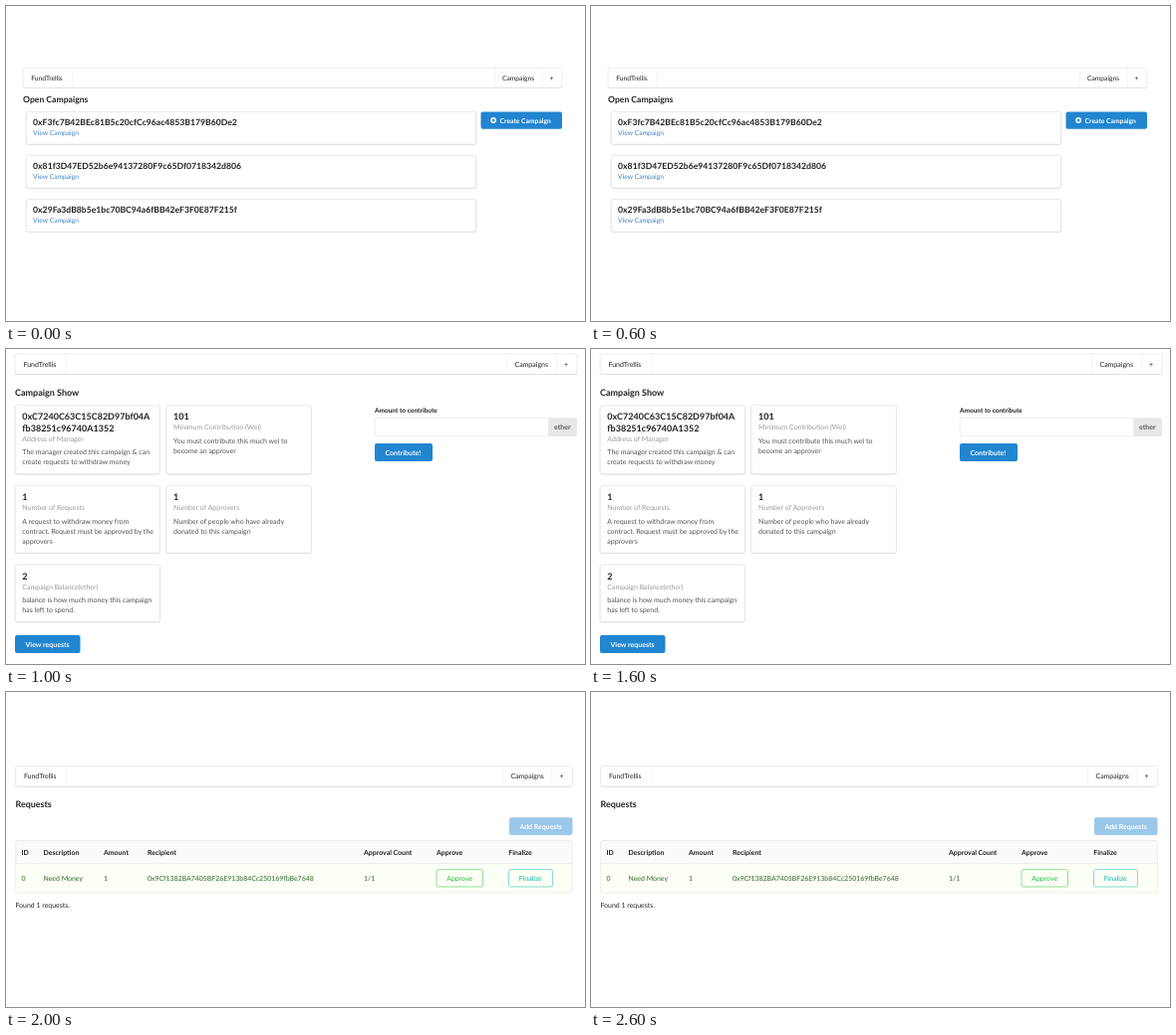
These frames come from a looping animation (581 px wide and 317 px high, 3 s). An HTML page with a canvas:

```html
<!DOCTYPE html>
<html lang="en">
<head>
<meta charset="utf-8">
<title>Campaign screens</title>
<style>
  html, body { margin: 0; width: 100%; height: 100%; overflow: hidden; background: #fff; }
  canvas { display: block; }
</style>
</head>
<body>
<canvas id="stage" width="581" height="317"></canvas>
<script>
const ctx = document.getElementById('stage').getContext('2d');
const SCREEN_MS = 1000;
const INK = 'rgba(0,0,0,.87)';
const LINE = 'rgba(34,36,38,.15)';
const BLUE = '#2185d0';
let unit = 0.5; // stage pixels per interface pixel

// y is the middle of the text line
function text(str, x, y, { size = 14, bold = false, color = INK } = {}) {
  const px = size * unit;
  ctx.font = `${bold ? 700 : 400} ${px}px Lato, sans-serif`;
  ctx.textRendering = 'geometricPrecision';
  ctx.fillStyle = color;
  ctx.fillText(str, x, y + px * 0.387);
}

const title = (str, x, y) => text(str, x, y, { size: 18, bold: true });

function box(x, y, w, h, fill, radius = 4) {
  ctx.beginPath();
  ctx.roundRect(x, y, w, h, typeof radius === 'number' ? radius * unit : radius.map(r => r * unit));
  ctx.fillStyle = fill;
  ctx.fill();
}

function outline(x, y, w, h, color) {
  ctx.beginPath();
  ctx.roundRect(x + unit / 2, y + unit / 2, w - unit, h - unit, 4 * unit);
  ctx.lineWidth = unit;
  ctx.strokeStyle = color;
  ctx.stroke();
}

function raised(x, y, w, h, blur, shadow) {
  ctx.save();
  ctx.shadowColor = shadow;
  ctx.shadowBlur = blur * unit;
  ctx.shadowOffsetY = unit;
  box(x, y, w, h, '#fff');
  ctx.restore();
}

function menu(x, y, w) {
  const h = 42 * unit, mid = y + h / 2, right = x + w - unit;
  const plus = right - 41 * unit;
  const campaigns = plus - 99 * unit;
  raised(x, y, w, h, 2, LINE);
  outline(x, y, w, h, LINE);
  ctx.fillStyle = 'rgba(34,36,38,.1)';
  for (const edge of [x + 103 * unit, campaigns, plus]) ctx.fillRect(edge, y + unit, unit, h - 2 * unit);
  text('FundTrellis', x + 17 * unit, mid);
  text('Campaigns', campaigns + 16 * unit, mid);
  text('+', plus + 16 * unit, mid);
}

function card(x, y, w, h, { head, meta, body = [], link }) {
  raised(x, y, w, h, 3, '#d4d4d5');
  outline(x - unit, y - unit, w + 2 * unit, h + 2 * unit, '#d4d4d5');
  const left = x + 14 * unit;
  let top = y + 10.14 * unit;
  const row = (str, height, style) => {
    text(str, left, top + height * unit / 2, style);
    top += height * unit;
  };
  head.forEach(str => row(str, 23.1, { size: 18, bold: true }));
  if (link) row(link, 20, { color: '#4183c4' });
  if (meta) row(meta, 20, { color: 'rgba(0,0,0,.4)' });
  top += 7 * unit;
  body.forEach(str => row(str, 20, { color: 'rgba(0,0,0,.68)' }));
}

function button(str, x, y, w, textX = x + 21 * unit, fill = BLUE) {
  const h = 36 * unit;
  box(x, y, w, h, fill);
  text(str, textX, y + h / 2, { bold: true, color: '#fff' });
}

function basicButton(str, x, y, w, color) {
  const h = 36 * unit;
  outline(x, y, w, h, color);
  text(str, x + 21 * unit, y + h / 2, { color });
}

function campaignList() {
  unit = 0.48;
  menu(17, 62, 541);
  title('Open Campaigns', 17, 94);
  [
    '0xF3fc7B42BEc81B5c20cfCc96ac4853B179B60De2',
    '0x81f3D47ED52b6e94137280F9c65Df0718342d806',
    '0x29Fa3dB8b5e1bc70BC94a6fBB42eF3F0E87F215f'
  ].forEach((address, i) =>
    card(20.4, 106.6 + i * 44.06, 451.2, 32.3, { head: [address], link: 'View Campaign' }));

  button('Create Campaign', 476.5, 106.5, 81.5, 495.6);
  ctx.fillStyle = '#fff';
  ctx.beginPath();
  ctx.arc(489.1, 115, 2.9, 0, Math.PI * 2);
  ctx.fill();
  ctx.fillStyle = BLUE;
  ctx.fillRect(487.3, 114.5, 3.6, 1);
  ctx.fillRect(488.6, 113.2, 1, 3.6);
}

function campaignDetails() {
  unit = 0.5004;
  menu(9, 4.6, 564);
  title('Campaign Show', 9, 43.5);
  const left = 9.3, second = 161.1, w = 145;
  card(left, 57, w, 68.7, {
    head: ['0xC7240C63C15C82D97bf04A', 'fb38251c96740A1352'],
    meta: 'Address of Manager',
    body: ['The manager created this campaign & can', 'create requests to withdraw money']
  });
  card(second, 57, w, 68.7, {
    head: ['101'],
    meta: 'Minimum Contribution (Wei)',
    body: ['You must contribute this much wei to', 'become an approver']
  });
  card(left, 137.9, w, 67.2, {
    head: ['1'],
    meta: 'Number of Requests',
    body: ['A request to withdraw money from', 'contract. Request must be approved by the', 'approvers']
  });
  card(second, 137.9, w, 67.2, {
    head: ['1'],
    meta: 'Number of Approvers',
    body: ['Number of people who have already', 'donated to this campaign']
  });
  card(left, 217.3, w, 57.2, {
    head: ['2'],
    meta: 'Campaign Balance(ether)',
    body: ['balance is how much money this campaign', 'has left to spend.']
  });
  button('View requests', 9, 288, 65.5);

  text('Amount to contribute', 370, 61.5, { size: 13, bold: true });
  outline(370, 69, 175, 19, LINE);
  box(544.4, 69, 28.6, 19, '#e8e8e8', [0, 4, 4, 0]);
  text('ether', 550, 78.4, { bold: true, color: 'rgba(0,0,0,.6)' });
  button('Contribute!', 370, 95, 58);
}

function requestTable() {
  unit = 0.496;
  const x = 9.5, y = 149.3, w = 559, h = 53, headH = 23.7;
  menu(x, 74.2, w);
  title('Requests', x, 113);
  button('Add Requests', 505, 126.2, 63.5, 515.4, '#9bc8ea');

  box(x, y, w, headH, '#f9fafb', [4, 4, 0, 0]);
  box(x, y + headH, w, h - headH, '#fcfff5', [0, 0, 4, 4]);
  ctx.fillStyle = 'rgba(34,36,38,.1)';
  ctx.fillRect(x, y + headH - unit, w, unit);
  outline(x, y, w, h, LINE);

  const address = '0x9Cf1382BA7405BF26E913b84Cc250169fbBe7648';
  [
    [15.5, 'ID', '0'],
    [37.5, 'Description', 'Need Money'],
    [98, 'Amount', '1'],
    [142, 'Recipient', address],
    [359, 'Approval Count', '1/1'],
    [432, 'Approve', ''],
    [504.3, 'Finalize', '']
  ].forEach(([left, label, value]) => {
    text(label, left, 161, { bold: true });
    text(value, left, 187.4, { color: '#2c662d' });
  });
  basicButton('Approve', 431.8, 178.4, 47, '#21ba45');
  basicButton('Finalize', 504.3, 178.4, 44.4, '#00b5ad');
  text('Found 1 requests.', x, 214.2);
}

const screens = [campaignList, campaignDetails, requestTable];

function draw() {
  ctx.fillStyle = '#fff';
  ctx.fillRect(0, 0, 581, 317);
  screens[Math.floor(performance.now() / SCREEN_MS) % screens.length]();
  requestAnimationFrame(draw);
}
draw();
</script>
</body>
</html>
```
